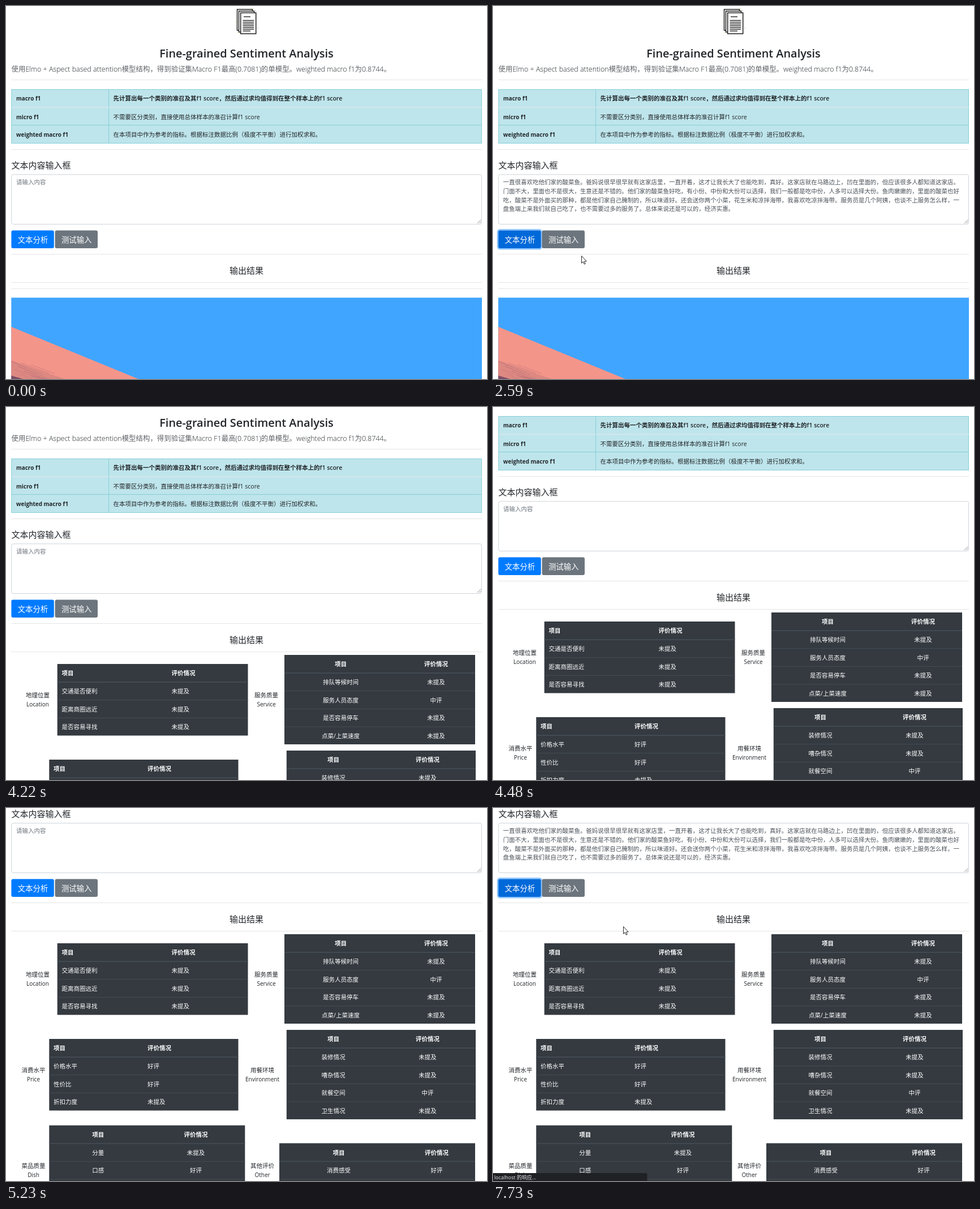
An HTML page that plays this animation: 850x659 px, repeating every 7990 ms.

```html
<!DOCTYPE html>
<html lang="zh-CN">
<head>
<meta charset="utf-8">
<title>Fine-grained Sentiment Analysis</title>
<style>
html, body { margin: 0; width: 100%; height: 100%; overflow: hidden; background: #fff; }
svg { display: block; width: 850px; height: 659px; }
text { font-family: "Open Sans", "Noto Sans CJK SC", "Noto Sans CJK", sans-serif; white-space: pre; }
</style>
</head>
<body>
<svg id="stage" viewBox="0 0 850 659" xmlns="http://www.w3.org/2000/svg"></svg>
<script>
const LOOP = 7990;
const INK = '#212529';

// ---- markup helpers ----
const rect = (x, y, w, h, fill, extra = '') =>
  `<rect x="${x}" y="${y}" width="${w}" height="${h}" fill="${fill}" ${extra}/>`;
const line = (x1, y1, x2, y2, color, width = 1) =>
  `<path d="M${x1} ${y1}L${x2} ${y2}" stroke="${color}" stroke-width="${width}" fill="none"/>`;
const group = (id, ...parts) => `<g id="${id}">${parts.join('')}</g>`;
const rule = y => line(9.5, y, 841, y, '#e5e5e5');
// Softens Chinese runs, which have no light weight.
const softChinese = str => str.replace(/[\u3000-\uffef]+/g, '<tspan fill="#5f6368">$&</tspan>');

// Text placed by its vertical centre.
function label(str, x, cy, { size = 10.5, weight = 400, fill = INK, anchor = 'start' } = {}) {
  const y = (cy + size * 0.375).toFixed(2);
  return `<text x="${x}" y="${y}" font-size="${size}" font-weight="${weight}" fill="${fill}" text-anchor="${anchor}">${str}</text>`;
}

// ---- page parts ----
function documentIcon() {
  const page = (x, y) => rect(x, y, 27, 37, '#fff', 'stroke="#111" stroke-width="1.4"');
  let s = page(408.5, 6) + page(411.5, 9) + page(414.7, 12);
  s += line(420, 19, 432, 19, '#111', 1.3);
  for (let i = 0; i < 7; i++) {
    const y = 25.5 + i * 3.1;
    s += line(418.5, y, i === 6 ? 432 : 438, y, '#111', 1.3);
  }
  [[406, 28, '#e5c77d'], [407, 38, '#e9a6a6'], [441, 8, '#9ccfd8'], [445, 39, '#b9a5d8'], [410, 47, '#e5c77d'], [437, 5, '#e5c77d']]
    .forEach(([x, y, c]) => { s += `<circle cx="${x}" cy="${y}" r=".8" fill="${c}"/>`; });
  return s;
}

function metricTable() {
  const edge = '#86cfda';
  const key = (s, y) => label(s, 18, y, { size: 9.95, weight: 700 });
  return rect(9.8, 147.5, 830.7, 95, '#bee5eb', `stroke="${edge}"`) +
    line(181.5, 147, 181.5, 243, edge) +
    line(9.5, 179.2, 841, 179.2, '#dbe8ec', 1.3) + line(9.5, 210.5, 841, 210.5, edge) +
    key('macro f1', 163.5) + key('micro f1', 196) + key('weighted macro f1', 227.5) +
    label('先计算出每一个类别的准召及其f1 score，然后通过求均值得到在整个样本上的f1 score', 189.5, 163.5, { weight: 600 }) +
    label('不需要区分类别，直接使用总体样本的准召计算f1 score', 189.5, 196) +
    label('在本项目中作为参考的指标。根据标注数据比例（极度不平衡）进行加权求和。', 189.5, 227.5);
}

const REVIEW = [
  '一直很喜欢吃他们家的酸菜鱼。爸妈说很早很早就有这家店里，一直开着，这才让我长大了也能吃到，真好。这家店就在马路边上，凹在里面的，但应该很多人都知道这家店。',
  '门面不大，里面也不是很大，生意还是不错的。他们家的酸菜鱼好吃，有小份、中份和大份可以选择，我们一般都是吃中份，人多可以选择大份。鱼肉嫩嫩的，里面的酸菜也好',
  '吃，酸菜不是外面买的那种，都是他们家自己腌制的，所以味道好。还会送你两个小菜，花生米和凉拌海带，我喜欢吃凉拌海带。服务员是几个阿姨，也谈不上服务怎么样，一',
  '盘鱼端上来我们就自己吃了，也不需要过多的服务了。总体来说还是可以的，经济实惠。'
];

function textBox() {
  return rect(9.8, 297.8, 830.7, 87.7, '#fff', 'rx="3" stroke="#ced4da"') +
    line(833, 384, 839.5, 377.5, '#777', .8) + line(836.5, 384, 839.5, 381, '#777', .8) +
    group('placeholder', label('请输入内容', 18, 311.3, { fill: '#6c757d' })) +
    group('review', ...REVIEW.map((s, i) => label(s, 17.8, 311.3 + i * 15.75, { fill: '#495057', size: 10.48 })));
}

const BUTTONS = [
  { id: 'analyse', x: 9.4, text: '文本分析', base: '#007bff', dark: '#0069d9', ring: '#268fff' },
  { id: 'sample', x: 86.6, text: '测试输入', base: '#6c757d', dark: '#5a6268', ring: '#828a91' }
];
const BUTTON_TOP = 396.4, BUTTON_W = 75.4, BUTTON_H = 31.6;

const button = b =>
  rect(b.x - 1.2, BUTTON_TOP - 1.2, BUTTON_W + 2.4, BUTTON_H + 2.4, 'none',
    `id="${b.id}Ring" rx="4" stroke="${b.ring}" stroke-opacity=".5" stroke-width="2.4"`) +
  rect(b.x, BUTTON_TOP, BUTTON_W, BUTTON_H, b.base, `id="${b.id}" rx="3"`) +
  label(b.text, b.x + BUTTON_W / 2 + .4, 412.8, { size: 13.4, fill: '#fff', anchor: 'middle' });

function banner() {
  let s = rule(499.5) + rect(9.3, 515.3, 831.7, 200, '#40a5ff') +
    '<path d="M9.3 566.7L234 659V716H9.3Z" fill="#f4958a"/>' +
    '<path d="M9.3 626L60 644L104 659H9.3Z" fill="#dd8982"/>';
  for (let i = 0; i < 12; i++) {
    const x = 10 + (i * 17) % 40, y = 628 + i * 2.8;
    s += line(x, y, x + 26 + (i * 23) % 30, y + 11 + (i * 7) % 9, i % 3 ? '#cb7a7c' : '#b96b76', .8);
  }
  return s + '<path d="M9.3 653L30 659H9.3Z" fill="#7d4d68"/>';
}

// ---- result tables ----
const NONE = '未提及', GOOD = '好评', FAIR = '中评';
const TABLES = [
  { x: 90.7, w: 336.8, y: 510, cols: [98.5, 292.5], name: ['地理位置', 'Location', 56, 573.5],
    rows: [['交通是否便利', NONE], ['距离商圈远近', NONE], ['是否容易寻找', NONE]] },
  { x: 492, w: 337, y: 494, cols: [591.5, 760], mid: true, name: ['服务质量', 'Service', 460, 573.5],
    rows: [['排队等候时间', NONE], ['服务人员态度', FAIR], ['是否容易停车', NONE], ['点菜/上菜速度', NONE]] },
  { x: 76.3, w: 334.2, y: 679, cols: [84, 250], name: ['消费水平', 'Price', 48.5, 742],
    rows: [['价格水平', GOOD], ['性价比', GOOD], ['折扣力度', NONE]] },
  { x: 495.8, w: 334.2, y: 663, cols: [578.5, 745], mid: true, name: ['用餐环境', 'Environment', 453, 742],
    rows: [['装修情况', NONE], ['嘈杂情况', NONE], ['就餐空间', FAIR], ['卫生情况', NONE]] },
  { x: 76.3, w: 346, y: 831.7, cols: [162.8, 335.5], mid: true, name: ['菜品质量', 'Dish', 48.5, 911],
    rows: [['分量', NONE], ['口感', GOOD], ['', '']] },
  { x: 483, w: 346, y: 863.3, cols: [588, 761], mid: true, name: ['其他评价', 'Other', 453, 911],
    rows: [['消费感受', GOOD], ['', '']] }
];

function resultTable({ x, w, y, cols, mid, name, rows }) {
  const anchor = mid ? 'middle' : 'start';
  const [zh, en, nx, ny] = name;
  let s = label(zh, nx, ny - 8, { anchor: 'middle' }) + label(en, nx, ny + 8, { size: 10, anchor: 'middle' });
  s += rect(x, y, w, 32 + 31.5 * rows.length, '#343a40');
  [['项目', '评价情况'], ...rows].forEach((cells, i) => {
    const cy = y + 16.3 + i * 31.7;
    if (i) s += line(x, y + 0.5 + i * 31.6, x + w, y + 0.5 + i * 31.6, '#454d55', i === 1 ? 1.6 : 1);
    cells.forEach((c, k) => {
      s += label(c, cols[k], cy, { fill: '#fff', weight: i ? 400 : 600, anchor });
    });
  });
  return s;
}

// ---- overlay ----
const statusBar = rect(-4, 645, 276.5, 20, '#202124', 'rx="2"') +
  label('localhost 的响应...', 2, 652.8, { size: 9, fill: '#e8eaed' });

const shape = (id, d, attrs) => `<path id="${id}" d="${d}" stroke="#111" stroke-width=".9" ${attrs}/>`;
const cursors =
  shape('arrow', 'M.5 .5V13.3L3.3 10.7L5.2 15.2L7.2 14.3L5.3 10H9.2Z', 'fill="#fff"') +
  shape('hand', 'M-.5 10V1.6Q.8-.4 2 1.6V6.4Q3.3 5.5 4.2 6.7Q5.5 6 6.3 7.2Q8 6.9 8 8.8V12Q8 14 6.8 15.2V17H.8V15.4L-3.5 10.6Q-3.7 8.6-2 9.2ZM2 6.4V9M4.2 6.7V9.2M6.3 7.2V9.5', 'fill="#fff"') +
  shape('beam', 'M-2.5-6.5H2.5M-2.5 6.5H2.5M0-6.5V6.5', 'fill="none"');

document.getElementById('stage').innerHTML =
  group('page',
    documentIcon(),
    label('Fine-grained Sentiment Analysis', 425, 84, { size: 19.9, weight: 600, anchor: 'middle' }),
    label(softChinese('使用Elmo + Aspect based attention模型结构，得到验证集Macro F1最高(0.7081)的单模型。weighted macro f1为0.8744。'),
      9.5, 111, { size: 12.45, weight: 300 }),
    rule(130.5), metricTable(), rule(253.5),
    label('文本内容输入框', 9.5, 281.5, { size: 15 }),
    textBox(), ...BUTTONS.map(button), rule(438.5),
    label('输出结果', 425, 467, { size: 15, anchor: 'middle' }), rule(488.5),
    group('banner', banner()),
    group('results', ...TABLES.map(resultTable))) +
  group('status', statusBar) + group('cursor', cursors);

// ---- timeline ----
// start, end, number of positions, from x y, to x y
const MOVES = [
  [130, 740, 6, 545, 577, 195, 448],
  [880, 1120, 3, 180, 446, 134, 421],
  [1750, 2110, 4, 118, 420, 60, 421],
  [2230, 2340, 2, 72, 432, 85, 441],
  [2590, 2590, 1, 156, 441, 156, 441],
  [2730, 2980, 3, 330, 420, 792.5, 354.5],
  [3120, 3120, 1, -50, 0, -50, 0],
  [5960, 6590, 6, 754, 292, 132, 143],
  [6970, 7220, 3, 112, 143, 55, 142],
  [7610, 7730, 2, 140, 176, 230, 209]
];
// time, offset
const SCROLL = [[0, 0], [3870, 4], [3990, 14], [4110, 32], [4220, 56], [4350, 91], [4480, 131], [4600, 171],
  [4730, 209], [4850, 235], [4980, 254], [5100, 266], [5230, 271]];
const SPANS = {
  review: [[1250, 3350], [6850, LOOP]],
  sampleRing: [[1250, 2110], [6850, 7340]],
  analyseRing: [[2110, 3350], [7340, LOOP]],
  status: [[2730, 3870], [7610, LOOP]],
  results: [[3350, LOOP]]
};

const el = id => document.getElementById(id);
const show = (id, on) => el(id).setAttribute('visibility', on ? 'visible' : 'hidden');
const during = (name, t) => SPANS[name].some(([a, b]) => t >= a && t < b);

function pointer(t) {
  const move = MOVES.findLast(m => t >= m[0]);
  if (!move) return [-50, 0];
  const [a, b, n, x0, y0, x1, y1] = move;
  if (n === 1) return [x0, y0];
  const k = Math.min(n - 1, Math.floor((t - a) / (b - a) * (n - 1) + 1e-6)) / (n - 1);
  return [x0 + (x1 - x0) * k, y0 + (y1 - y0) * k];
}

function render(t) {
  const scroll = SCROLL.findLast(s => t >= s[0])[1];
  const [x, y] = pointer(t);
  const pageY = y + scroll;
  const over = (left, top, w, h) => x >= left && x <= left + w && pageY >= top && pageY <= top + h;

  el('page').setAttribute('transform', `translate(0 ${-scroll})`);
  Object.keys(SPANS).forEach(name => show(name, during(name, t)));
  show('placeholder', !during('review', t));
  show('banner', !during('results', t));

  let kind = over(10, 298, 831, 88) ? 'beam' : 'arrow';
  BUTTONS.forEach(b => {
    const hover = over(b.x, BUTTON_TOP, BUTTON_W, BUTTON_H);
    if (hover) kind = 'hand';
    el(b.id).setAttribute('fill', hover || during(b.id + 'Ring', t) ? b.dark : b.base);
  });
  ['arrow', 'hand', 'beam'].forEach(id => show(id, id === kind));
  el('cursor').setAttribute('transform', `translate(${x} ${y})`);
}

const began = performance.now();
function tick() {
  render((performance.now() - began) % LOOP);
  requestAnimationFrame(tick);
}
tick();
</script>
</body>
</html>
```
